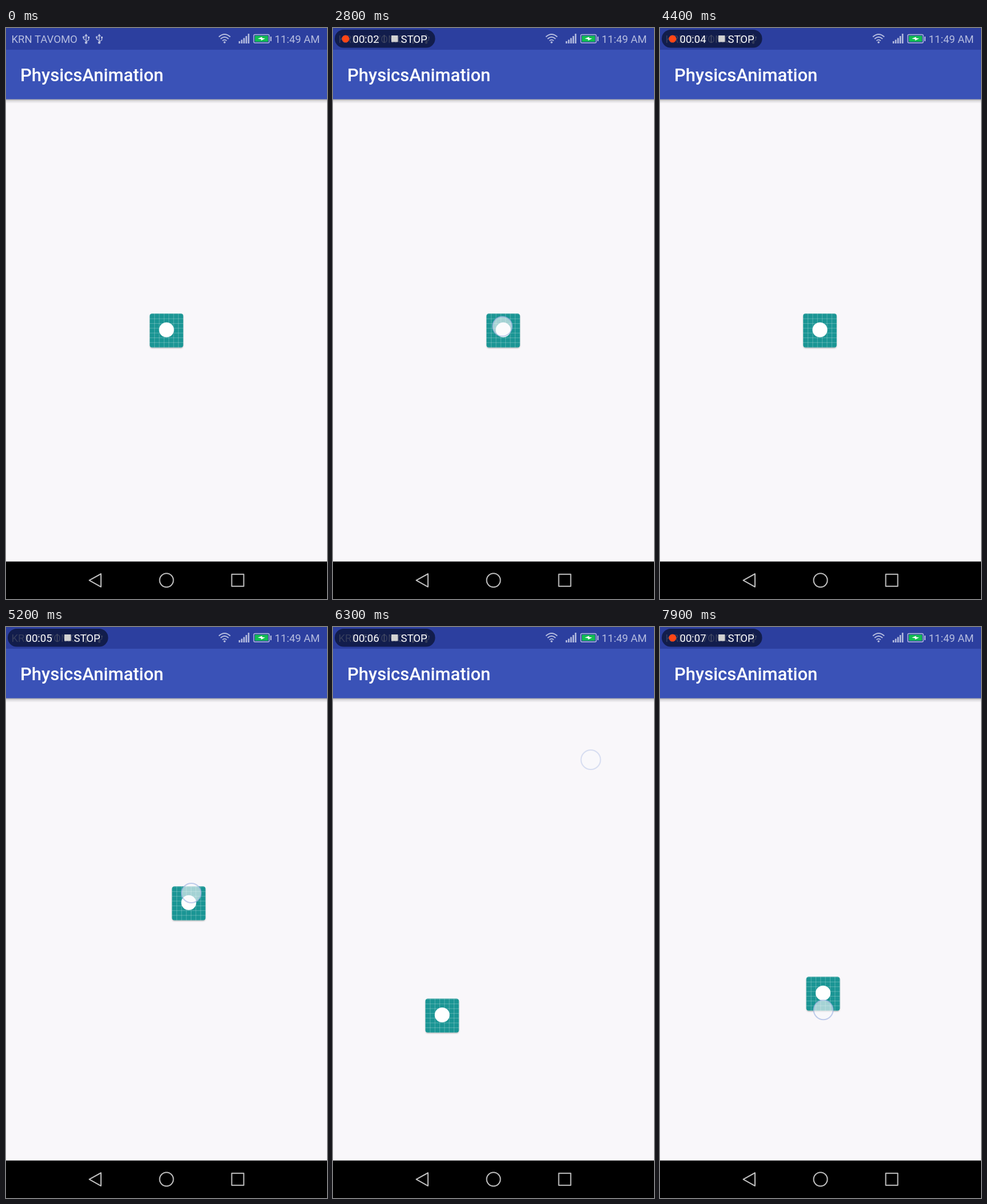
Animation, 561 px wide and 998 px high, one loop 8000 ms. Source, as an HTML page:

```html
<!DOCTYPE html>
<html lang="en">
<head>
<meta charset="utf-8">
<title>PhysicsAnimation</title>
<style>
  html, body { margin: 0; width: 100%; height: 100%; overflow: hidden; background: #f9f7fa; }
  svg { display: block; width: 561px; height: 998px; font: 18.5px Roboto, sans-serif; }
  .title { font-size: 31px; font-weight: 500; fill: #fff; }
  .status { fill: #b7bee0; }
  .line { fill: none; stroke: #b7bee0; stroke-width: 1.8; }
  .thin { stroke-width: 1.4; }
  .bars { stroke-width: 2.6; }
  .nav { fill: none; stroke: #c0c0c0; stroke-width: 2; stroke-linejoin: round; }
</style>
</head>
<body>
<svg viewBox="0 0 561 998">
  <defs>
    <linearGradient id="shade" x2="0" y2="1">
      <stop stop-color="#000" stop-opacity=".36"/>
      <stop offset=".4" stop-color="#000" stop-opacity=".12"/>
      <stop offset="1" stop-color="#000" stop-opacity="0"/>
    </linearGradient>
    <filter id="soft" x="-20%" y="-20%" width="140%" height="140%"><feGaussianBlur stdDeviation="1"/></filter>
    <g id="usb">
      <path class="line thin" d="M0 -5V6M0 3L-4.5 0V-3M0 5L4.5 2V-2"/>
      <path class="status" d="M0 -9L3 -4.5H-3Z"/>
      <circle class="status" cy="6.5" r="2.2"/>
      <circle class="status" cx="-4.5" cy="-3" r="1.7"/>
      <rect class="status" x="3" y="-4" width="3" height="3"/>
    </g>
  </defs>

  <rect width="561" height="998" fill="#f9f7fa"/>
  <rect y="124" width="561" height="8" fill="url(#shade)"/>
  <rect width="561" height="124.5" fill="#3a52b7"/>
  <rect width="561" height="38" fill="#2c3f9f"/>
  <text class="title" x="25" y="93">PhysicsAnimation</text>

  <text class="status" x="9.5" y="26">KRN TAVOMO</text>
  <use href="#usb" x="140" y="19"/>
  <use href="#usb" x="163" y="19"/>

  <path class="line" d="M372 15.5Q382 6.5 392 15.5M375 19Q382 12.5 389 19M378.3 22.3Q382 19 385.7 22.3"/>
  <circle class="status" cx="382" cy="25" r="1.8"/>
  <path id="traffic" class="status" d="M388 22V27L385 24.5ZM389.3 22V27L392.3 24.5Z"/>
  <path class="line bars" d="M408 27V23M412 27V20.5M416 27V17.5M420 27V14M424 27V10"/>
  <rect class="line thin" x="433" y="11.5" width="27" height="14.5" rx="2"/>
  <rect x="435" y="13.5" width="23" height="10.5" fill="#12bd52"/>
  <path fill="#fff" d="M440 18.8L447.5 15.5V17.8L453 18.2L445.8 22V19.6Z"/>
  <rect class="status" x="462" y="15" width="2" height="8"/>
  <text class="status" x="548.5" y="26" text-anchor="end">11:49 AM</text>

  <g id="recorder">
    <rect x="3" y="3" width="175.5" height="31.5" rx="15.75" fill="#0a1230" fill-opacity=".75"/>
    <circle id="dot" cx="22" cy="19" r="6.5" fill="#ff4616"/>
    <text id="clock" x="34.5" y="26" fill="#fff">00:00</text>
    <path d="M89.5 12V26" stroke="#4b5068" stroke-width="1.5"/>
    <rect x="102" y="13" width="11.5" height="11.5" fill="#d2d2d2"/>
    <text x="118.5" y="26" fill="#fff">STOP</text>
  </g>

  <g id="tile">
    <rect x="-29" y="-28" width="58" height="58.5" rx="4" fill="#000" fill-opacity=".32" filter="url(#soft)"/>
    <rect x="-29.5" y="-30" width="59" height="59.5" rx="4.5" fill="#1a9594"/>
    <path id="grid" stroke="#fff" stroke-opacity=".32" stroke-width=".8"/>
    <circle cy="-1.5" r="13" fill="#fff"/>
  </g>
  <circle id="touch" r="17" fill="#f8f8fc" fill-opacity=".62" stroke="#a0b4e2" stroke-opacity=".65" stroke-width="2"/>

  <rect y="932.5" width="561" height="65.5"/>
  <path class="nav" d="M145.5 965.3L166 954V976.8Z"/>
  <circle class="nav" cx="280.5" cy="965.3" r="12"/>
  <rect class="nav" x="394.5" y="954.7" width="21" height="21"/>
</svg>
<script>
const LOOP = 8000, STEP = 100;
const HOME = [280.5, 529];
const BLINK = 511, FIRST_TICK = 770;
const FADE = 200;
const DAMPING = 0.2, OMEGA = Math.sqrt(1500);

// power: acceleration per axis; grab: finger offset; lead: how far the finger runs ahead, in ms
const drags = [
  { down: 2300, up: 3790, to: [474.5, 530], power: [2.23, 2.23], grab: [-1.5, -7.5], lead: 0 },
  { down: 4750, up: 6218, to: [451, 243], power: [1.25, 1.55], grab: [-0.5, -11], lead: 45 },
  { down: 7000, up: 8000, to: [286.5, 679], power: [2.75, 2.75], grab: [0.5, 28], lead: 0 }
];

const $ = id => document.getElementById(id);
const show = (id, on) => $(id).setAttribute("opacity", +on);
const place = (id, [x, y]) => $(id).setAttribute("transform", `translate(${x} ${y})`);
const clamp = v => Math.max(0, Math.min(1, v));

function dragged({ down, up, to, power }, t) {
  const p = clamp((t - down) / (up - down));
  return HOME.map((h, i) => h + (to[i] - h) * p ** power[i]);
}

// Free underdamped spring, released at rest from 1
function spring(ms) {
  const s = Math.max(0, ms) / 1000, root = Math.sqrt(1 - DAMPING ** 2), w = OMEGA * root;
  return Math.exp(-DAMPING * OMEGA * s) * (Math.cos(w * s) + DAMPING / root * Math.sin(w * s));
}

function draw(t) {
  const drag = drags.filter(d => d.down <= t).pop();
  if (drag) {
    const since = t - drag.up, k = spring(since);
    place("tile", dragged(drag, t).map((v, i) => HOME[i] + (v - HOME[i]) * k));
    place("touch", dragged(drag, t + drag.lead).map((v, i) => v + drag.grab[i]));
    show("touch", clamp(1 - since / FADE));
  } else {
    place("tile", HOME);
    show("touch", 0);
  }
  const beat = Math.floor((t - FIRST_TICK) / BLINK);
  show("dot", beat % 2);
  $("clock").textContent = "00:0" + Math.max(0, Math.floor(beat / 2) + 1);
  show("recorder", clamp(t / 200));
  show("traffic", t >= 1100 && t < 2100);
}

$("grid").setAttribute("d", Array.from({ length: 8 }, (_, i) => {
  const p = -29.2 + i * 8.33;
  return `M${p} -30V29.5M-29.5 ${p}H29.5`;
}).join(""));

function tick() {
  const t = performance.now() % LOOP;
  draw(Math.floor(t / STEP) * STEP);
  requestAnimationFrame(tick);
}
tick();
</script>
</body>
</html>
```
